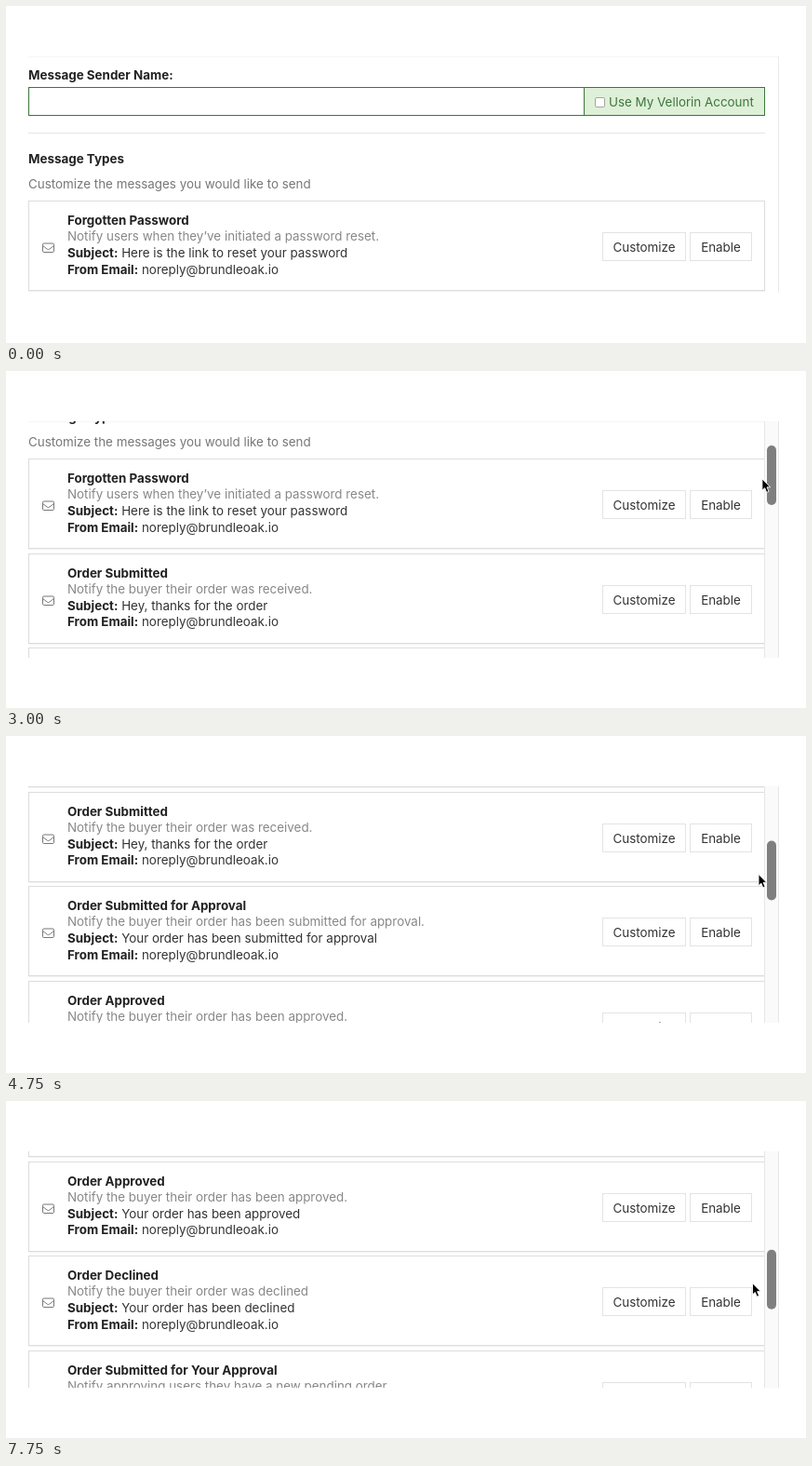
These frames come from a looping animation (860 by 362 pixels, 8 s). An HTML page:

```html
<!DOCTYPE html>
<html lang="en">
<head>
<meta charset="utf-8">
<title>Message settings</title>
<style>
  @property --scroll { syntax: "<number>"; inherits: true; initial-value: 0; }
  @property --x { syntax: "<number>"; inherits: true; initial-value: 900; }
  @property --dy { syntax: "<number>"; inherits: true; initial-value: 32.4; }
  @property --bar { syntax: "<number>"; inherits: true; initial-value: 0; }

  html, body { margin: 0; width: 100%; height: 100%; overflow: hidden; background: #fff; }
  .stage {
    --thumb: calc(52.6px + var(--scroll) * .2386px);
    position: relative; width: 860px; height: 362px; overflow: hidden;
    font: 13.4px/18px Inter, "Open Sans", sans-serif; color: #333; white-space: nowrap;
    animation: drag 8s infinite;
  }
  .stage * { position: absolute; box-sizing: border-box; }
  .stage b { position: static; font-weight: 700; color: #222; }

  .view {
    left: 0; top: 54px; width: 831px; height: 254px; overflow: hidden;
    border-right: 1px solid #e9e9e9;
  }
  .edge { left: 24px; top: 54px; width: 806px; height: 1px; background: #f5f5f5; }
  .page { left: 0; top: calc(-54px - var(--scroll) * 1px); width: 830px; height: 900px; }
  .text { left: 24px; }
  .muted { color: #777; }

  .field { left: 24px; top: 87px; width: 792px; height: 31px; border: 1px solid #3c763d; }
  .addon {
    right: 0; top: 0; width: 194px; height: 29px;
    background: #dff0d8; border-left: 1px solid #3c763d; color: #3c763d;
  }
  .addon .text { left: 26px; top: 6px; }
  .check {
    left: 11px; top: 10px; width: 11px; height: 11px;
    background: #fff; border: 1px solid #a5a5a5; border-radius: 2px;
  }
  .rule { left: 24px; top: 136px; width: 792px; height: 1px; background: #e6e6e6; }

  .card {
    left: 24px; width: 792px; height: 97px; background: #fff;
    border: 1px solid #ddd; box-shadow: 0 1px 1px rgba(0, 0, 0, .05);
  }
  .card .text { left: 41px; }
  .card .muted { color: #888; }
  .card svg { left: 14px; top: 44px; }
  .button {
    top: 33px; height: 31px; line-height: 30px;
    border: 1px solid #e3e3e3; text-align: center;
  }
  .customize { left: 616px; width: 90px; }
  .enable { left: 710px; width: 67px; }

  .track {
    left: 815px; top: 54px; width: 16px; height: 254px;
    background: #fafafa; border: solid #e7e7e7; border-width: 0 1px;
    opacity: var(--bar);
  }
  .thumb {
    left: 818px; top: 0; width: 10px; height: 63.5px;
    background: #7f7f7f; border-radius: 5px;
    opacity: var(--bar); transform: translateY(var(--thumb));
  }
  .cursor {
    left: 0; top: 0; overflow: visible;
    transform: translate(calc(var(--x) * 1px), calc(var(--thumb) + 35.5px + var(--dy) * 1px));
  }

  @keyframes drag {
    0%      { --scroll: 0; --x: 900; --dy: 32.4; --bar: 0; animation-timing-function: step-end; }
    6.25%   { --scroll: 0; --x: 835; --dy: 32.4; --bar: 0; animation-timing-function: step-end; }
    12.5%   { --scroll: 0; --x: 829; --dy: 16; --bar: 0; animation-timing-function: steps(2); }
    18.75%  { --scroll: 0; --x: 817; --dy: 0; --bar: 1; animation-timing-function: steps(3); }
    28.125% { --scroll: 22.5; --x: 816; --dy: 0; --bar: 1; animation-timing-function: steps(5); }
    43.75%  { --scroll: 176; --x: 810; --dy: 0; --bar: 1; animation-timing-function: steps(5); }
    59.375% { --scroll: 251; --x: 808.5; --dy: 0; --bar: 1; animation-timing-function: steps(4); }
    71.875% { --scroll: 356; --x: 804; --dy: 0; --bar: 1; animation-timing-function: steps(3); }
    81.25%  { --scroll: 379; --x: 802; --dy: 0; --bar: 1; animation-timing-function: steps(5); }
    96.875%, 100% { --scroll: 449; --x: 802; --dy: 0; --bar: 1; animation-timing-function: step-end; }
  }
</style>
</head>
<body>
<div class="stage">
  <div class="edge"></div>
  <div class="view">
    <div class="page">
      <div class="text" style="top:65px"><b>Message Sender Name:</b></div>
      <div class="field">
        <div class="addon">
          <i class="check"></i>
          <div class="text">Use My Vellorin Account</div>
        </div>
      </div>
      <div class="rule"></div>
      <div class="text" style="top:155px"><b>Message Types</b></div>
      <div class="text muted" style="top:182px">Customize the messages you would like to send</div>
    </div>
  </div>
  <div class="track"></div>
  <div class="thumb"></div>
  <svg class="cursor" width="10" height="16">
    <path d="M.5 .5V12.8L3.3 10.2L5.3 15L7.6 14L5.6 9.4H9.3Z" fill="#000" stroke="#fff" stroke-width=".9"/>
  </svg>
</div>
<script>
  const messages = [
    ["Forgotten Password", "Notify users when they’ve initiated a password reset.", "Here is the link to reset your password"],
    ["Order Submitted", "Notify the buyer their order was received.", "Hey, thanks for the order"],
    ["Order Submitted for Approval", "Notify the buyer their order has been submitted for approval.", "Your order has been submitted for approval"],
    ["Order Approved", "Notify the buyer their order has been approved.", "Your order has been approved"],
    ["Order Declined", "Notify the buyer their order was declined", "Your order has been declined"],
    ["Order Submitted for Your Approval", "Notify approving users they have a new pending order.", "An order needs your approval"]
  ];
  const envelope = `<svg width="13" height="12" fill="none" stroke="#777">
    <rect x=".5" y="1" width="12" height="9.5" rx="1.2"/><path d="M.7 3.6L5.3 7.2Q6.5 8 7.7 7.2L12.3 3.6"/></svg>`;
  const line = (top, html, kind = "") => `<div class="text ${kind}" style="top:${top}px">${html}</div>`;
  const card = ([title, note, subject], i) => `
    <div class="card" style="top:${209 + i * 101.5}px">
      ${envelope}
      ${line(11, `<b>${title}</b>`)}
      ${line(28, note, "muted")}
      ${line(46, `<b>Subject:</b> ${subject}`)}
      ${line(63.5, "<b>From Email:</b> noreply@brundleoak.io")}
      <div class="button customize">Customize</div>
      <div class="button enable">Enable</div>
    </div>`;
  document.querySelector(".page").insertAdjacentHTML("beforeend", messages.map(card).join(""));
</script>
</body>
</html>
```
